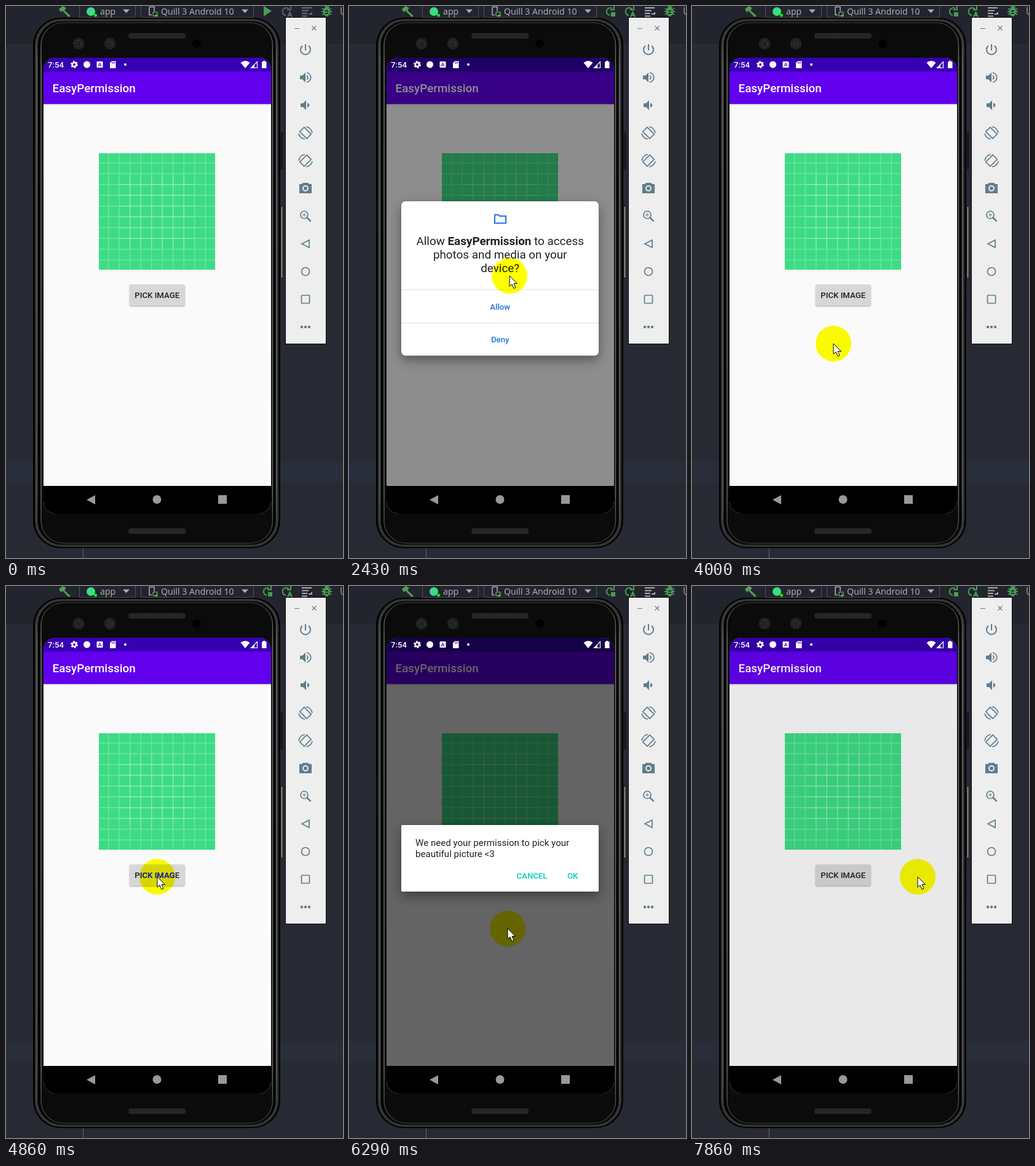
Write an HTML page that moves like this. It is 548 px wide and 896 px high and loops after 8000 ms.

```html
<!DOCTYPE html>
<html lang="en">
<head>
<meta charset="utf-8">
<title>Permission demo</title>
<style>
  html, body { margin: 0; width: 100%; height: 100%; overflow: hidden; background: #282a33; }
  svg { display: block; width: 548px; height: 896px; isolation: isolate; }
  text { font-family: Roboto, sans-serif; font-size: 13.2px; }
  .ide { font-family: "Open Sans", "Noto Sans", sans-serif; font-size: 14.2px; fill: #b3b6bb; }
  .medium { font-weight: 500; }
  .title { font-size: 18.85px; }
  .body { font-size: 15.08px; fill: #222; }
  .mid { text-anchor: middle; }
  .card { filter: drop-shadow(0 7px 9px #0006); }
  .button { filter: drop-shadow(0 1px 1px #0005); }
  .button.pressed { filter: drop-shadow(0 3px 3px #0007); }
  .button.pressed rect { fill: #b9baba; }
  .line { fill: none; stroke: #607d8b; stroke-width: 1.7; }
  #highlight { mix-blend-mode: multiply; }
</style>
</head>
<body>
<svg viewBox="0 0 548 896">
  <defs>
    <linearGradient id="rim" x2="0" y2="1">
      <stop offset="0" stop-color="#333"/><stop offset=".08" stop-color="#777"/>
      <stop offset=".9" stop-color="#686868"/><stop offset="1" stop-color="#333"/>
    </linearGradient>
    <pattern id="mesh" width="3" height="3" patternUnits="userSpaceOnUse">
      <rect width="3" height="3" fill="#292929"/><circle cx="1.5" cy="1.5" r=".8" fill="#171717"/>
    </pattern>
    <clipPath id="screen"><rect x="61" y="84" width="370" height="740" rx="20"/></clipPath>
    <clipPath id="spot"><circle id="spotCircle" r="29"/></clipPath>
  </defs>

  <!-- IDE behind the emulator -->
  <rect width="548" height="896" fill="#282a33"/>
  <rect width="548" height="59" fill="#22252d"/>
  <path d="M0 59.5H548" stroke="#1c1e25"/>
  <rect y="739" width="548" height="35" fill="#2a2e3a"/>
  <path d="M125.5 880v16" stroke="#666a72"/>
  <path d="M119.500 0v18.500H210.500V0M219.500 0v18.500H402.500V0" fill="none" stroke="#4d5159"/>
  <path d="M86 5l6-5 6 3-3 4 10 9-3 2-10-10-3 2z" fill="#549b57"/>
  <circle cx="138" cy="9" r="7" fill="#3ddc84"/>
  <circle cx="145.500" cy="15" r="2.500" fill="#0f0"/>
  <text class="ide" x="153" y="14">app</text>
  <path d="M190 5.500h11l-5.500 6zM383 5.500h11l-5.500 6z" fill="#a9acb1"/>
  <path d="M233 1.500h8v7M233 1.500v13h4" fill="none" stroke="#a9acb1" stroke-width="1.600"/>
  <path d="M239 10h7v6h-7z" fill="none" stroke="#a9acb1"/>
  <circle cx="244.500" cy="15.500" r="2" fill="#0f0"/>
  <text class="ide" x="252" y="14">Quill 3 Android 10</text>
  <path id="run" d="M419 0l13 8-13 9z" fill="#499c54"/>
  <g id="rerun" fill="none" stroke="#499c54" stroke-width="2">
    <path d="M424 15a6 6 0 1 1 4-11M425 6h6V0"/><path d="M426 10h7v7h-7z" fill="#499c54" stroke="none"/>
  </g>
  <g id="apply" fill="none" stroke-width="2">
    <path d="M455 15a6 6 0 1 1 5-10M457 6h6V0M458 18l3.500-8 3.500 8M459.500 15h4"/>
  </g>
  <g id="lines" fill="none" stroke-width="2">
    <path d="M481 3h16M481 7.500h11M481 12h9M481 16.500h9M492 13h5v-3"/>
  </g>
  <g stroke="#499c54" stroke-width="1.800"><path d="M514 4l15 10M529 4l-15 10M513 9h17M518 0l8 2"/>
    <ellipse cx="521.500" cy="9" rx="4.500" ry="7" fill="#499c54"/><path d="M519 8h5M519 12h5" stroke="#22252d"/></g>
  <path d="M545 2v7q0 4 3 5" fill="none" stroke="#777a80" stroke-width="2"/>

  <!-- Phone body -->
  <path d="M448.500 205v60" stroke="#17181c" stroke-width="4"/>
  <path d="M448 324v119" stroke="#222" stroke-width="4"/>
  <path d="M448.500 326v115" stroke="#aaa" stroke-width="1.500"/>
  <rect x="44" y="19" width="402" height="861" rx="45" fill="#020202"/>
  <g fill="none" stroke="url(#rim)">
    <rect x="48.500" y="22.500" width="393" height="854" rx="41" stroke="#353535" stroke-width="3"/>
    <rect x="50.500" y="24" width="389" height="851" rx="40" stroke-width="1.300"/>
    <rect x="57" y="27" width="376.500" height="845" rx="36" stroke-width="1.500" fill="#0b0b0b"/>
  </g>
  <rect x="199" y="44" width="93" height="9" rx="4" fill="url(#mesh)"/>
  <rect x="199" y="848" width="93" height="9" rx="4" fill="url(#mesh)"/>
  <g fill="#202124"><circle cx="118" cy="61" r="9.500"/><circle cx="169" cy="61" r="9.500"/></g>
  <g fill="none" stroke="#41434a" stroke-dasharray="4 3"><circle cx="118" cy="61" r="5"/><circle cx="169" cy="61" r="4"/></g>
  <circle cx="310" cy="61" r="7" fill="#000"/>

  <!-- App -->
  <g clip-path="url(#screen)">
    <rect x="61" y="84" width="370" height="740" fill="#fafafa"/>
    <rect x="61" y="159" width="370" height="1.500" fill="#ccc"/>
    <rect x="61" y="84" width="370" height="75" fill="#6200ee"/>
    <rect x="61" y="84" width="370" height="22.500" fill="#3700b3"/>
    <text class="title medium" x="75.500" y="140" fill="#fff">EasyPermission</text>
    <g transform="translate(151 239) scale(1.75)">
      <rect width="108" height="108" fill="#3ddc84"/>
      <path id="grid" fill="none" stroke="#fff" stroke-opacity=".25" stroke-width=".8"/>
      <path id="innerGrid" fill="none" stroke="#fff" stroke-opacity=".2" stroke-width=".8"/>
    </g>
    <g id="button" class="button">
      <rect x="201" y="452" width="89.500" height="34.500" rx="2" fill="#d6d7d7"/>
      <text class="medium mid" x="245.700" y="474" fill="#202020">PICK IMAGE</text>
    </g>
    <rect id="dim" x="61" y="84" width="370" height="695"/>
    <rect x="61" y="779" width="370" height="45" fill="#000"/>
    <g fill="#999"><path d="M145 794v15l-14-7.500z"/><circle cx="245.500" cy="801" r="7"/><path d="M345 794h14v14h-14z"/></g>
    <g fill="#fff">
      <text class="medium" x="68" y="100" fill="#fff">7:54</text>
      <circle cx="111" cy="95" r="3.200" fill="none" stroke="#fff" stroke-width="2.600"/>
      <circle cx="111" cy="95" r="5" fill="none" stroke="#fff" stroke-width="2" stroke-dasharray="2.600 2.636"/>
      <circle cx="131.500" cy="95" r="5.500"/>
      <rect x="147.500" y="90" width="10" height="10" rx="1"/>
      <path d="M150 98l2.500-6 2.500 6M151 96h3" fill="none" stroke="#3700b3"/>
      <path d="M172 89.500h6.500v11.500H169v-8.500z"/><path d="M172.500 91v2.500m2-2.500v2.500m2-2.500v2.500" stroke="#3700b3"/>
      <circle cx="194" cy="95" r="2"/>
      <path d="M381.500 92q7.500-6 15 0l-7.500 9z"/>
      <path d="M398.500 100.500l10-10v10z" fill="none" stroke="#fff" stroke-width="1.200"/><path d="M399 100.500l5-5v5z"/>
      <path d="M418 89h3.500v1.500h2V101H416V90.500h2z"/>
    </g>

    <g id="permission" class="card">
      <rect x="85" y="317" width="321" height="250.500" rx="7" fill="#fff"/>
      <path d="M237 339h6l2 2h10v11.500h-18z" fill="none" stroke="#1a73e8" stroke-width="2"/>
      <g class="mid" fill="#202124">
        <text class="title" x="245.700" y="388">Allow <tspan font-weight="700">EasyPermission</tspan> to access</text>
        <text class="title" x="245.700" y="410">photos and media on your</text>
        <text class="title" x="245.700" y="432">device?</text>
      </g>
      <path d="M85 460.500h321M85 514.500h321" stroke="#e2e2e2"/>
      <g class="mid medium" fill="#1a73e8"><text x="245.700" y="492.500">Allow</text><text x="245.700" y="546">Deny</text></g>
    </g>

    <g id="rationale" class="card">
      <rect x="85" y="388" width="321" height="108" rx="2" fill="#fff"/>
      <text class="body" x="108" y="422">We need your permission to pick your</text>
      <text class="body" x="108" y="439.500">beautiful picture &lt;3</text>
      <g class="medium" fill="#03cdb9"><text x="272.500" y="475">CANCEL</text><text x="355" y="475">OK</text></g>
    </g>
  </g>

  <!-- Emulator side panel -->
  <rect x="454.500" y="18.500" width="66" height="530" fill="#eee" stroke="#0a0a0a"/>
  <path d="M469 36.500h8M497.500 32.500l7 7m0-7l-7 7" class="line" style="stroke-width:1.200"/>
  <g class="line" transform="translate(487 71)"><path d="M0-9v10M-5-6.500a8 8 0 1 0 10 0" stroke-width="2"/></g>
  <g transform="translate(487 116)"><path d="M-9-3h4l5-5V8l-5-5h-4z" fill="#607d8b"/><path class="line" d="M2-3q4 3 0 6M2-8c9 3 9 13 0 16"/></g>
  <g transform="translate(485 161)"><path d="M-6-3h4l5-5V8l-5-5h-4z" fill="#607d8b"/><path d="M5-4q7 4 0 8z" fill="#607d8b"/></g>
  <g id="rotate" class="line" transform="translate(487 206)">
    <rect x="-5" y="-8" width="10" height="16" transform="rotate(-45)"/><path d="M1-10q8 1 10 10M-11 1q2 8 10 9"/>
  </g>
  <use href="#rotate" transform="matrix(-1 0 0 1 974 45)"/>
  <g transform="translate(487 296)"><path d="M-4-9h8l2 2h4v15h-20v-15h4z" fill="#607d8b"/><circle r="4" fill="#607d8b" stroke="#eee" stroke-width="2"/></g>
  <g class="line" transform="translate(485 339)"><circle r="6"/><path d="M4.500 4.500l6 6" stroke-width="2.500"/><path d="M-3 0h6M0-3v6" stroke-width="1"/></g>
  <path class="line" d="M493 380v12l-12-6z"/>
  <circle class="line" cx="487" cy="431" r="6.500"/>
  <rect class="line" x="480.500" y="469.500" width="13" height="13" rx="1"/>
  <g fill="#607d8b"><circle cx="481" cy="521" r="2.200"/><circle cx="487" cy="521" r="2.200"/><circle cx="493" cy="521" r="2.200"/></g>

  <!-- Pointer -->
  <circle id="highlight" r="29" fill="#ff0"/>
  <g clip-path="url(#spot)"><text id="tint" class="medium mid" x="245.700" y="474" fill="#2222b8">PICK IMAGE</text></g>
  <path id="arrow" d="M0 0v17l4-3.500 3 7 3-1.300-3-6.700h5.500z" fill="#fff" stroke="#000"/>
</svg>
<script>
const FPS = 7, COUNT = 56;
const $ = id => document.getElementById(id);

// Each track is a list of [step, value, ...] joined by straight lines.
const pointer = [
  [1, 6, 79], [2, 38, 130], [3, 88, 230], [4, 140, 330], [5, 186, 412], [6, 222, 458], [7, 241, 475], [8, 247, 470],
  [14, 247, 470], [15, 250, 464], [17, 261, 438], [19, 264, 440], [23, 246, 538], [26, 243, 542],
  [28, 230, 548], [30, 229, 549], [33, 244, 480], [34, 246, 472], [36, 246, 472], [38, 240, 522],
  [40, 237, 555], [43, 242, 564], [46, 290, 540], [49, 348, 490], [51, 368, 471], [53, 368, 470], [55, 367, 472]
];
const dimming = [[15, 0], [16, .15], [17, .44], [18, .6], [26, .6], [27, .28], [28, 0], [37, 0], [38, .09], [39, .45], [40, .6], [53, .6], [54, .35], [55, .065]];
const permission = [[15, 0], [16, .4], [17, 1], [26, 1], [27, .35], [28, 0]];
const rationale = [[37, 0], [38, .3], [39, .9], [40, 1], [53, 1], [54, .4], [55, 0]];

function sample(track, step) {
  const next = track.findIndex(key => key[0] >= step);
  if (next < 0) return track[track.length - 1].slice(1);
  if (next === 0) return track[0].slice(1);
  const a = track[next - 1], b = track[next], mix = (step - a[0]) / (b[0] - a[0]);
  return a.slice(1).map((v, i) => v + (b[i + 1] - v) * mix);
}

function gridPath(from, to, start, end) {
  let d = "";
  for (let p = from; p <= to; p += 10) d += `M${p} ${start}V${end}M${start} ${p}H${end}`;
  return d;
}
$("grid").setAttribute("d", gridPath(9, 99, 0, 108));
$("innerGrid").setAttribute("d", gridPath(29, 79, 19, 89));

const show = (id, visible) => $(id).style.display = visible ? "" : "none";
const fade = (id, alpha) => { $(id).style.opacity = alpha; show(id, alpha > 0); };

function render(step) {
  const [x, y] = sample(pointer, step);
  for (const id of ["highlight", "arrow", "spotCircle"]) $(id).setAttribute("transform", `translate(${x} ${y})`);
  for (const id of ["highlight", "arrow"]) show(id, step > 0);

  const [shade] = sample(dimming, step);
  fade("dim", shade);
  fade("permission", sample(permission, step)[0]);
  fade("rationale", sample(rationale, step)[0]);
  show("tint", step > 0 && shade === 0);
  $("button").classList.toggle("pressed", (step >= 12 && step <= 14) || step === 35 || step === 36);

  const running = step >= 11;
  show("run", !running);
  show("rerun", running);
  $("apply").setAttribute("stroke", running ? "#499c54" : "#5f6268");
  $("lines").setAttribute("stroke", running ? "#a9acb1" : "#6b6e74");
}

let shown = -1;
function tick(now) {
  const step = Math.floor(now * FPS / 1000 + .03) % COUNT;
  if (step !== shown) render(shown = step);
  requestAnimationFrame(tick);
}
render(0);
requestAnimationFrame(tick);
</script>
</body>
</html>
```
